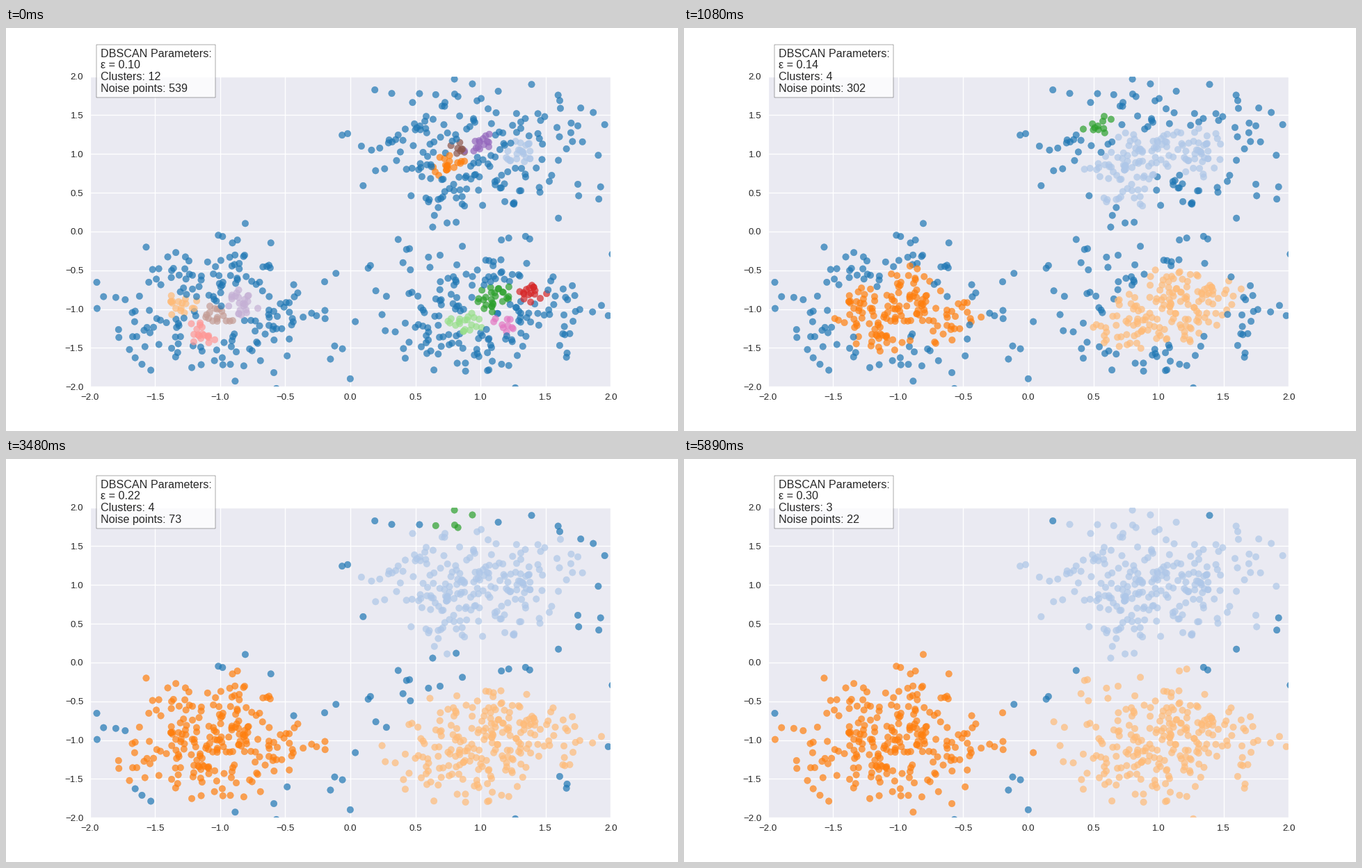
Recreate the animation shown at these times as a matplotlib script. Size 966 by 580 pixels, loop 6.01 s.

```python
import numpy as np
import matplotlib.pyplot as plt
from matplotlib.animation import FuncAnimation

DPI = 96
LOOP = 6010      # ms
FRAMES = 200
STEP = 120       # ms per epsilon value
SCALE = 96.6 / DPI
INK = "0.15"

plt.rcParams.update({
    "font.family": "Liberation Sans",
    "text.color": INK,
    "axes.facecolor": "#EAEAF2",
    "axes.linewidth": 0,
    "axes.axisbelow": True,
    "axes.grid": True,
    "grid.color": "white",
    "grid.linestyle": "-",
    "grid.linewidth": SCALE,
    "patch.linewidth": 0.3 * SCALE,
})
for axis in ("xtick", "ytick"):
    plt.rcParams.update({
        f"{axis}.color": INK,
        f"{axis}.labelsize": 10 * SCALE,
        f"{axis}.major.size": 0,
        f"{axis}.major.pad": 7 * SCALE,
    })


def make_blobs(centers, per_center=250, std=0.4, seed=0):
    rng = np.random.RandomState(seed)
    points = np.vstack([rng.normal(c, std, (per_center, 2)) for c in centers])
    order = np.arange(len(points))
    rng.shuffle(order)
    return points[order]


def dbscan(dist, eps, min_samples=10):
    """Label each point with its cluster, or -1 for noise."""
    near = dist <= eps
    core = near.sum(axis=1) >= min_samples
    labels = np.full(len(dist), -1)
    cluster = 0
    for seed in np.flatnonzero(core):
        if labels[seed] >= 0:
            continue
        labels[seed] = cluster
        front = np.array([seed])
        while front.size:
            reached = near[front].any(axis=0) & (labels < 0)
            labels[reached] = cluster
            front = np.flatnonzero(reached & core)
        cluster += 1
    return labels


points = make_blobs([(1, 1), (-1, -1), (1, -1)])
dist = np.hypot(*(points[:, None] - points[None]).transpose(2, 0, 1))
epsilons = np.linspace(0.1, 0.3, 50)
runs = [dbscan(dist, eps) for eps in epsilons]
palette = np.array(plt.get_cmap("tab20").colors)

fig, ax = plt.subplots(figsize=(966 / DPI, 580 / DPI), dpi=DPI, facecolor="white")
ax.set(xlim=(-2, 2), ylim=(-2, 2))
ticks = np.linspace(-2, 2, 9)
ax.set_xticks(ticks)
ax.set_yticks(ticks)

dots = ax.scatter(*points.T, s=50 * SCALE**2, alpha=0.7, color=palette[0])
info = ax.text(0.02, 0.95, "", transform=ax.transAxes, fontsize=12 * SCALE,
               linespacing=1.15,
               bbox=dict(facecolor="white", edgecolor="black", alpha=0.8))


def run_at(ms):
    # one step in the later part is held 10 ms longer
    if ms >= 38 * STEP:
        ms -= 10
    return min(int(ms // STEP), len(runs) - 1)


def update(frame):
    i = run_at((frame + 1) * LOOP / FRAMES)
    labels = runs[i]
    dots.set_color(palette[(labels + 1) % len(palette)])
    info.set_text(f"DBSCAN Parameters:\n"
                  f"ε = {epsilons[i]:.2f}\n"
                  f"Clusters: {labels.max() + 1}\n"
                  f"Noise points: {np.sum(labels < 0)}")
    return dots, info


anim = FuncAnimation(fig, update, frames=FRAMES, interval=LOOP / FRAMES,
                     repeat=True, repeat_delay=0, blit=False)
plt.show()
```
